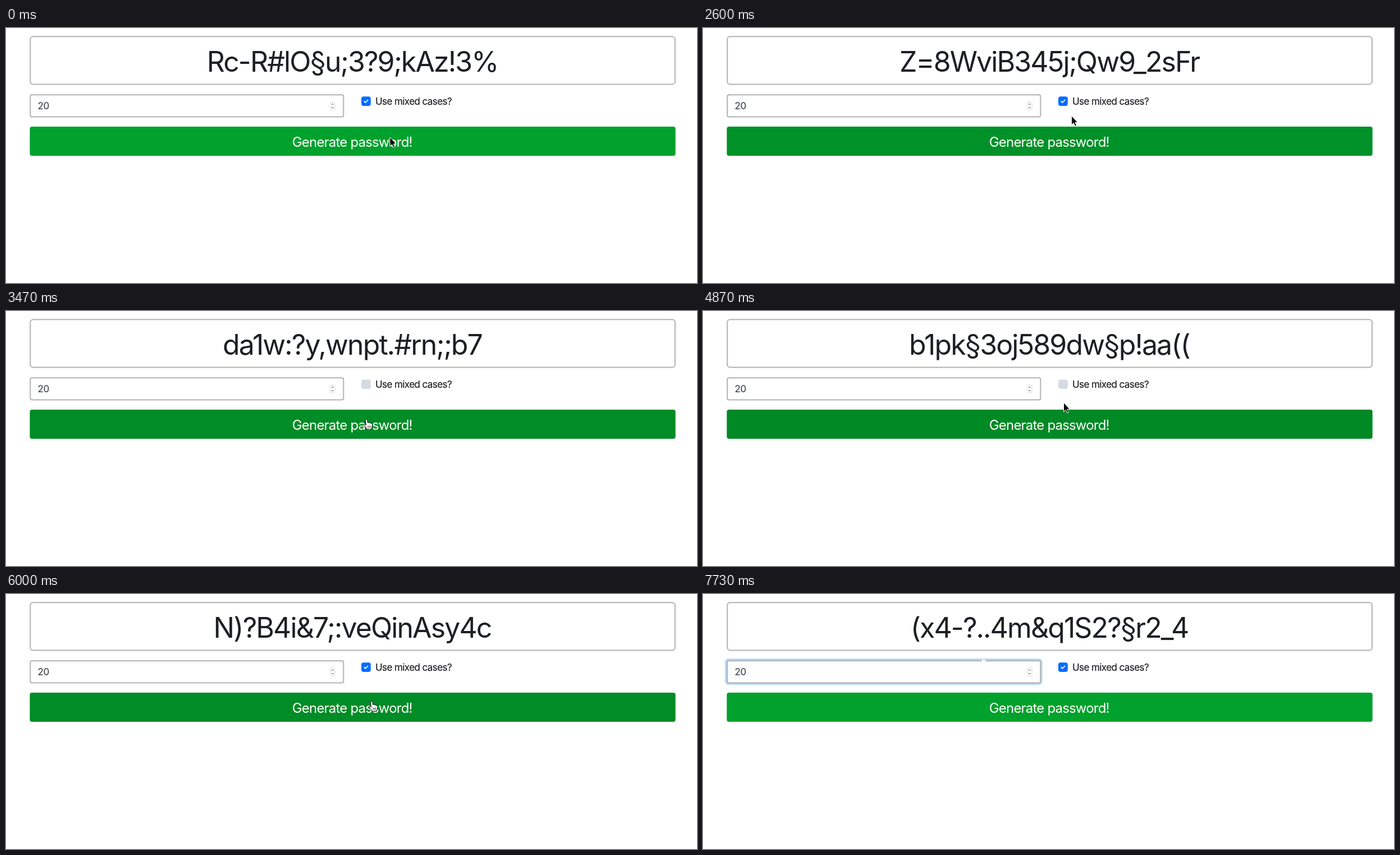
These frames come from a looping animation (1231 px wide and 455 px high, 8 s). An HTML page:

```html
<!DOCTYPE html>
<html lang="en">
<head>
<meta charset="utf-8">
<title>Password generator</title>
<style>
  html, body { margin: 0; width: 100%; height: 100%; overflow: hidden; background: #fff; }
  svg { display: block; width: 100vw; height: 100vh; }
  text {
    font-family: Inter, Roboto, "Liberation Sans", sans-serif;
    font-feature-settings: "calt" 0;
    font-optical-sizing: none;
    fill: #1c1f23;
    white-space: pre;
  }
  .mid { text-anchor: middle; }
  .field { fill: #fff; stroke: #b2b2b2; stroke-width: 2; }
  #password { font-size: 50px; letter-spacing: -.038em; }
  #label { font-size: 17px; letter-spacing: -.034em; stroke: #1c1f23; stroke-width: .2; }
  #length { font-size: 17px; letter-spacing: -.02em; fill: #40474e; stroke: #40474e; stroke-width: .2; }
  #action { font-size: 24px; letter-spacing: -.034em; fill: #fff; }
</style>
</head>
<body>
<svg viewBox="0 0 1231 455" preserveAspectRatio="none">
  <rect class="field" x="43.3" y="15.2" width="1148.6" height="85.4" rx="5"/>
  <text id="password" class="mid" x="617" y="77.5"></text>

  <rect id="ring" x="39.2" y="115.2" width="565.4" height="46.8" rx="6" fill="#b0d8fc"/>
  <rect class="field" x="43.3" y="119.2" width="558" height="39.4" rx="3"/>
  <text id="length" x="56.6" y="145.3">20</text>
  <rect id="caret" x="76.4" y="129.5" width="1.3" height="19.5" fill="#333"/>
  <rect x="577.6" y="131.5" width="8.4" height="15" rx="4" fill="#fff" stroke="#d0d0d0" stroke-width=".8"/>
  <path d="M580 137l1.8-2.1 1.8 2.1M580 141l1.8 2.1 1.8-2.1" fill="none" stroke="#555" stroke-width="1"/>

  <rect id="box" x="633" y="122.2" width="16.8" height="16.8" rx="4"/>
  <path id="tick" d="M638.2 130.8l2.2 2.2 4.2-4.5" fill="none" stroke="#fff" stroke-width="1.8" stroke-linecap="round" stroke-linejoin="round"/>
  <text id="label" x="658" y="136.8">Use mixed cases?</text>

  <rect id="button" x="42.4" y="176.1" width="1150.3" height="51.9" rx="4"/>
  <text id="action" class="mid" x="616.7" y="211.6">Generate password!</text>

  <g id="cursor">
    <path id="arrow" d="M0 0V16L3.6 12.7L6.2 18.5L8.8 17.4L6.3 11.7H11Z" stroke="#fff"/>
    <g id="hand" stroke="#000" stroke-linejoin="round">
      <path fill="#fff" d="M-2 2C-2-.5 1.4-.5 1.6 1.6L2.2 6C3.4 5 5 5.3 5.2 6.5C6.4 5.8 7.8 6.2 8 7.4C9.3 6.9 10.4 7.8 10.4 9.2L10 13.2L8.6 17.4H.5L-1.4 14.2L-4.6 10.4C-5.5 8.8-3.8 8-2.6 9L-1 10.4Z"/>
      <path fill="none" stroke-width=".8" d="M2.5 11v4M4.8 11v4M7 11v4"/>
    </g>
    <g id="beam" fill="none">
      <path id="stem" d="M-3.2-8.5Q0-8.5 0-6V6.5Q0 9-3.2 9M3.2-8.5Q0-8.5 0-6M0 6.5Q0 9 3.2 9M-2 2H2" stroke="#fff" stroke-width="3"/>
      <use href="#stem" style="stroke:#111;stroke-width:1.3"/>
    </g>
  </g>
</svg>
<script>
const LOOP = 8000, STEP = 1000 / 15;
const FADE = 150, MOVE = 400, BLINK = 560;
const LIGHT = [0, 161, 45], DARK = [0, 128, 34];
const AWAKE = 500, BLUR = 1230, REFOCUS = 7160;
const UNCHECK = 3120, CHECK = 5460;

const $ = id => document.getElementById(id);
const ease = v => {
  v = Math.max(0, Math.min(1, v));
  return v * v * (3 - 2 * v);
};
const mix = (a, b, k) => a + (b - a) * k;
const show = (id, on) => $(id).setAttribute('visibility', on ? 'visible' : 'hidden');

// each click yields the next password
const passwords = [
  { at: 0, text: 'Rc-R#lO§u;3?9;kAz!3%' },
  { at: 1390, text: 'Vt8?fj.R;e2s!Kl=4rc7' },
  { at: 2190, text: 'Z=8WviB345j;Qw9_2sFr' },
  { at: UNCHECK, text: 'da1w:?y,wnpt.#rn;;b7' },
  { at: 4520, text: 'b1pk§3oj589dw§p!aa((' },
  { at: CHECK, text: 'N)?B4i&7;:veQinAsy4c' },
  { at: 6460, text: '(x4-?..4m&q1S2?§r2_4' }
];

// the pointer shuttles between button and checkbox, then goes to the field
const moves = [
  { at: 670, x: 683.5, y: 198.5 },
  { at: 2368, x: 640, y: 131 },
  { at: 3130, x: 642.5, y: 198 },
  { at: 4663, x: 642.5, y: 131 },
  { at: 5655, x: 652, y: 195 },
  { at: 6600, x: 500, y: 127 }
];

function pointer(t) {
  return moves.reduce((p, m) => {
    const k = ease((t - m.at) / MOVE);
    return { x: mix(p.x, m.x, k), y: mix(p.y, m.y, k) };
  }, { x: 684, y: 195 });
}

const onButton = t => t >= AWAKE && pointer(t).y > 176;

// share of the fade window spent over the button
function hover(t) {
  const n = 15;
  let hits = 0;
  for (let i = 0; i < n; i++) hits += onButton(t - FADE * (i + .5) / n);
  return ease(hits / n);
}

function draw(t) {
  const { text } = passwords.filter(p => p.at <= t).pop();
  if ($('password').textContent !== text) $('password').textContent = text;

  const mixed = t < UNCHECK || t >= CHECK;
  $('box').setAttribute('fill', mixed ? '#006cff' : '#d5dbe2');
  show('tick', mixed);

  const dark = hover(t);
  $('button').setAttribute('fill', `rgb(${LIGHT.map((c, i) => Math.round(mix(c, DARK[i], dark)))})`);

  const since = t - (t < REFOCUS ? AWAKE : REFOCUS);
  const focused = t >= AWAKE && t < BLUR || t >= REFOCUS;
  $('ring').setAttribute('opacity', focused ? ease(since / FADE) : t > BLUR ? 1 - ease((t - BLUR) / FADE) : 0);
  show('caret', focused && since % (2 * BLINK) < BLINK);

  const { x, y } = pointer(t);
  const hand = t > UNCHECK && onButton(t);
  const beam = x < 602 && y < 160;
  $('cursor').setAttribute('transform', `translate(${x} ${y})`);
  show('hand', hand);
  show('beam', beam);
  show('arrow', !hand && !beam);
}

function tick() {
  const t = performance.now() % LOOP;
  draw(Math.floor((t + 5) / STEP) * STEP % LOOP);
  requestAnimationFrame(tick);
}
tick();
</script>
</body>
</html>
```
